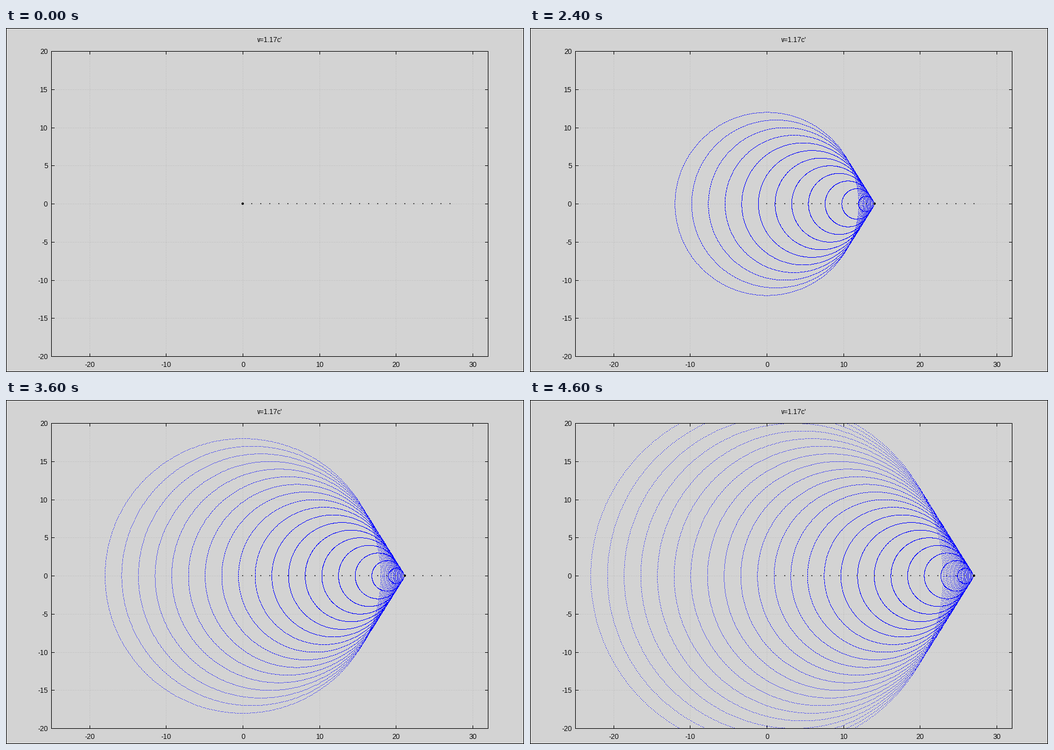
These frames come from a looping animation (917x611 px, 4.8 s). A matplotlib script:

```python
import numpy as np
import matplotlib.pyplot as plt
from matplotlib.animation import FuncAnimation
from matplotlib.patches import Circle

W, H, DPI = 917, 611, 64
PX = 72 / DPI                               # one pixel in points
LEFT, RIGHT, TOP, BOTTOM = 80, 853, 41, 583
STEPS, SPEED = 24, 1 / 0.85
BACK, GRID, SPOT, BLACK, BLUE = 211, 184, 80, 0, (0, 0, 255)

plt.rcParams.update({"font.family": "Liberation Sans", "text.hinting": "native",
                     "text.hinting_factor": 1})


def to_x(x):
    return LEFT + (x + 25) * (RIGHT - LEFT) / 57


def to_y(y):
    return BOTTOM - (y + 20) * (BOTTOM - TOP) / 40


def pixel(v):
    return np.floor(np.asarray(v) + 0.5).astype(int)


fig = plt.figure(figsize=(W / DPI, H / DPI), dpi=DPI, facecolor="#d3d3d3")
ax = fig.add_axes([0, 0, 1, 1])
ax.set_xlim(0, W)
ax.set_ylim(H, 0)
ax.axis("off")

grid = np.full((H, W, 3), BACK, np.uint8)
axes = np.zeros((H, W), bool)               # crisp black lines kept on top


def frame(x0, y0, x1, y1):
    axes[[y0, y1], x0:x1 + 1] = True
    axes[y0:y1 + 1, [x0, x1]] = True


def label(x, baseline, text, ha="center"):
    ax.text(x, baseline, text, ha=ha, va="baseline", fontsize=12 * PX, zorder=6)


frame(0, 0, W - 1, H - 1)
frame(LEFT, TOP, RIGHT, BOTTOM)
for v in range(-20, 31, 10):
    x = pixel(to_x(v))
    grid[TOP:BOTTOM:3, x] = GRID
    axes[TOP:TOP + 6, x] = axes[BOTTOM - 5:BOTTOM, x] = True
    label(x + 0.8, 602, str(v))
for v in range(-20, 21, 5):
    y = pixel(to_y(v))
    grid[y, LEFT:RIGHT:3] = GRID
    axes[y, LEFT:LEFT + 6] = axes[y, RIGHT - 5:RIGHT] = True
    label(74, y + 5, str(v), ha="right")
label(466.7, 25, "v=1.17c'")

mid = int(pixel(to_y(0)))
spots = pixel(to_x(np.arange(STEPS) * SPEED))
angle = np.arange(0, 2 * np.pi, 0.01)

view = ax.imshow(grid, extent=(0, W, H, 0), interpolation="nearest",
                 aspect="auto", zorder=1)
source = ax.add_patch(Circle((0, mid), 2.1, fc="black", lw=0, zorder=4))


def draw(t):
    img = grid.copy()
    for k in range(t):
        r = t - k
        x = pixel(to_x(k * SPEED + r * np.cos(angle)))
        y = pixel(to_y(r * np.sin(angle)))
        inside = (x > LEFT) & (x < RIGHT) & (y > TOP) & (y < BOTTOM)
        img[y[inside], x[inside]] = BLUE
    for x in spots:
        img[mid - 1:mid + 1, x - 1:x + 1] = SPOT
    img[axes] = BLACK
    view.set_data(img)
    source.center = (spots[t], mid)
    return view, source


anim = FuncAnimation(fig, draw, frames=STEPS, interval=200,
                     repeat=True, repeat_delay=0, blit=False)
plt.show()
```
